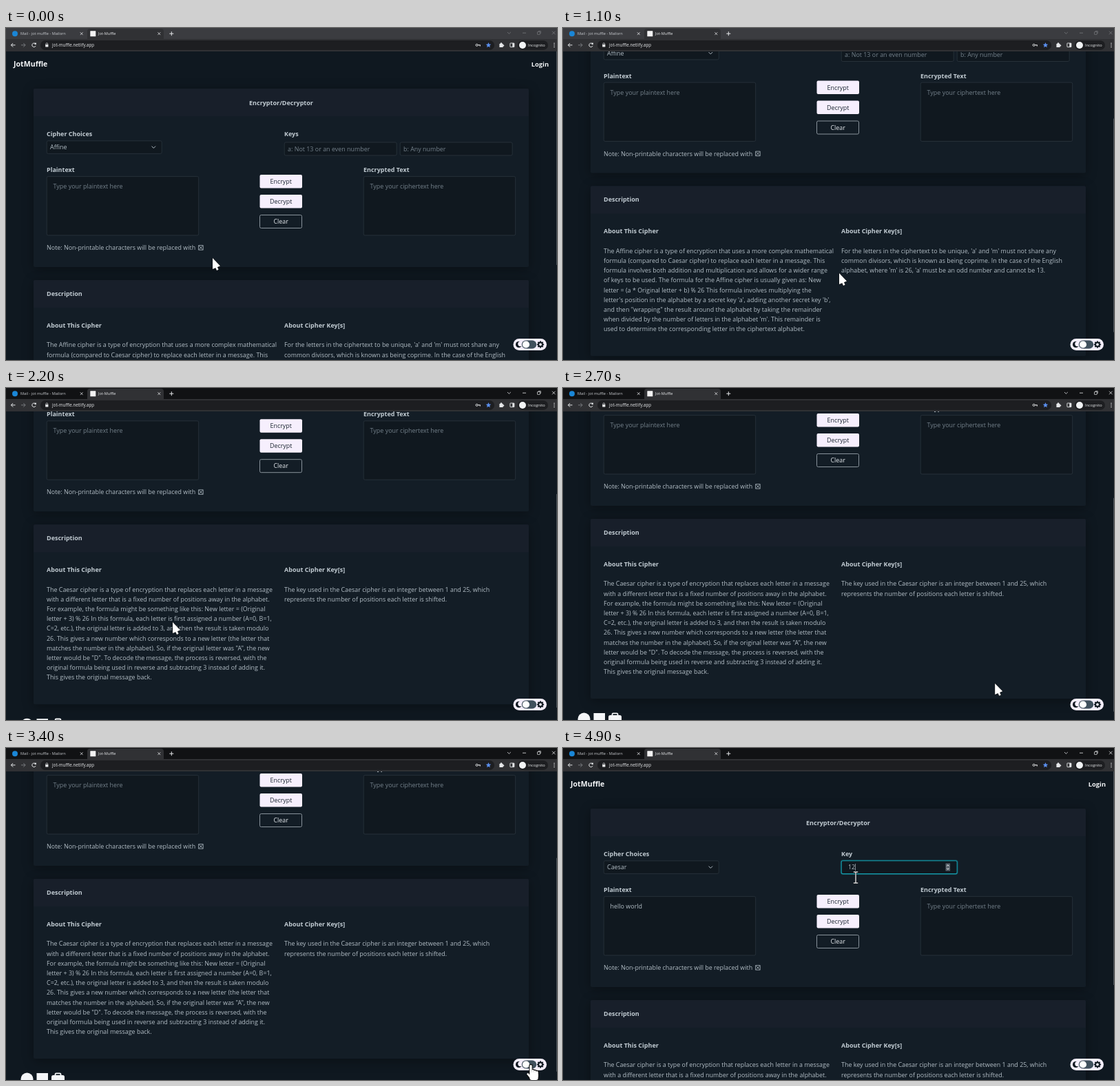
Recreate the animation shown at these times as an HTML page with a canvas. Size 800 px wide and 482 px high, loop 5 s.

```html
<!DOCTYPE html>
<html lang="en">
<head>
<meta charset="utf-8">
<title>Jot-Muffle</title>
<style>
html, body { margin: 0; width: 100%; height: 100%; overflow: hidden; background: #0f1820; }
canvas { display: block; width: 100vw; height: 100vh; }
</style>
</head>
<body>
<canvas id="stage" width="800" height="482"></canvas>
<script>
const g = document.getElementById('stage').getContext('2d');
const LOOP = 5000, STEP = 100, TOP = 34, LEADING = 14.2;

const DARK = {
  page: '#0f1820', card: '#131d26', head: '#181f2a', shadow: 'rgba(0,0,0,.35)', field: '#10181f',
  border: '#29333c', text: '#b3bec6', bold: '#c2ccd3', title: '#f4f6f8', hint: '#74818b',
  button: '#f6effd', label: '#1b2530', outline: '#89939b', clear: '#e6eaee', icon: '#f4f6f8',
  pill: '#f6effd', pillIcon: '#10181f', track: '#40505d', thumb: '#4a5259'
};
const LIGHT = {
  page: '#fefcff', card: '#fffeff', head: '#fdf9ff', shadow: 'rgba(110,70,130,.22)', field: '#fffeff',
  border: '#dbd7e0', text: '#4a5866', bold: '#35424e', title: '#1b2832', hint: '#75828c',
  button: '#1b2832', label: '#ffffff', outline: '#808b95', clear: '#33414d', icon: '#22272d',
  pill: '#1b2832', pillIcon: '#ffffff', track: '#12a0b4', thumb: '#9a9a9a'
};

const AFFINE = {
  name: 'Affine',
  about: [
    'The Affine cipher is a type of encryption that uses a more complex mathematical',
    'formula (compared to Caesar cipher) to replace each letter in a message. This',
    'formula involves both addition and multiplication and allows for a wider range',
    'of keys to be used. The formula for the Affine cipher is usually given as: New',
    'letter = (a * Original letter + b) % 26 This formula involves multiplying the',
    "letter's position in the alphabet by a secret key 'a', adding another secret key 'b',",
    'and then "wrapping" the result around the alphabet by taking the remainder',
    "when divided by the number of letters in the alphabet 'm'. This remainder is",
    'used to determine the corresponding letter in the ciphertext alphabet.'
  ],
  keys: [
    "For the letters in the ciphertext to be unique, 'a' and 'm' must not share any",
    'common divisors, which is known as being coprime. In the case of the English',
    "alphabet, where 'm' is 26, 'a' must be an odd number and cannot be 13."
  ]
};
const CAESAR = {
  name: 'Caesar',
  about: [
    'The Caesar cipher is a type of encryption that replaces each letter in a message',
    'with a different letter that is a fixed number of positions away in the alphabet.',
    'For example, the formula might be something like this: New letter = (Original',
    'letter + 3) % 26 In this formula, each letter is first assigned a number (A=0, B=1,',
    'C=2, etc.), the original letter is added to 3, and then the result is taken modulo',
    '26. This gives a new number which corresponds to a new letter (the letter that',
    'matches the number in the alphabet). So, if the original letter was "A", the new',
    'letter would be "D". To decode the message, the process is reversed, with the',
    'original formula being used in reverse and subtracting 3 instead of adding it.',
    'This gives the original message back.'
  ],
  keys: [
    'The key used in the Caesar cipher is an integer between 1 and 25, which',
    'represents the number of positions each letter is shifted.'
  ]
};

// Motion

function ease(t, from, to) {
  const u = Math.min(1, Math.max(0, (t - from) / (to - from)));
  return u * u * (3 - 2 * u);
}
const scrollAt = t =>
  117 * ease(t, 200, 770) + 19.5 * ease(t, 1000, 1100) - 136.5 * ease(t, 1100, 1500) +
  176 * (ease(t, 1900, 2245) - ease(t, 3400, 3700));

const REST = { x: 300, y: 334 };
const STOPS = [
  { at: 1100, x: 401, y: 356 },
  { at: 1500, x: 150, y: 176 },
  { at: 2200, x: 242, y: 340 },
  { at: 2800, x: 762, y: 460 },
  { at: 3800, x: 229, y: 255 },
  { at: 4700, x: 425, y: 188 }
];
function pointerAt(t) {
  let { x, y } = REST;
  for (const p of STOPS) {
    const u = ease(t, p.at - 300, p.at);
    x += (p.x - x) * u;
    y += (p.y - y) * u;
  }
  return { x, y };
}

function stateAt(t) {
  return {
    ...pointerAt(t),
    scroll: scrollAt(t),
    theme: t >= 3000 && t < 3400 ? LIGHT : DARK,
    cipher: t < 1800 ? AFFINE : CAESAR,
    windowFocus: t >= 1600,
    pointer: t >= 3800 ? beam : t >= 2800 && t <= 3400 ? hand : arrow,
    caret: t === 3800,
    plain: 'hello world'.slice(0, Math.max(0, (t - 3800) / 50)),
    plainFocus: t >= 3900 && t < 4600,
    keyFocus: t >= 4700,
    key: '12'.slice(0, Math.max(0, (t - 4700) / 100))
  };
}

// Drawing helpers

function text(s, x, y, color, { size = 8.93, bold = false, align = 'left' } = {}) {
  g.save();
  g.translate(x, y + size * .35);
  g.scale(.1, .1); // keeps fractional glyph advances
  g.font = `${bold ? 700 : 400} ${size * 10}px "Open Sans", "Noto Sans", sans-serif`;
  g.textAlign = align;
  g.fillStyle = color;
  g.fillText(s, 0, 0);
  g.restore();
}
const strong = (s, x, y, color, opt) => text(s, x, y, color, { size: 9, bold: true, ...opt });

function paint(fill, stroke, lw) {
  if (fill) { g.fillStyle = fill; g.fill(); }
  if (stroke) { g.strokeStyle = stroke; g.lineWidth = lw; g.stroke(); }
}
function box(x, y, w, h, r, fill, stroke, lw = .8) {
  g.beginPath();
  g.roundRect(x, y, w, h, r);
  paint(fill, stroke, lw);
}
function dot(x, y, r, fill, stroke, lw = 1) {
  g.beginPath();
  g.arc(x, y, r, 0, 7);
  paint(fill, stroke, lw);
}
function line(color, lw, ...pts) {
  g.beginPath();
  for (let i = 0; i < pts.length; i += 2) g.lineTo(pts[i], pts[i + 1]);
  paint(null, color, lw);
}
function cross(x, y, r, color) {
  for (const k of [-r, r]) line(color, .8, x - r, y - k, x + r, y + k);
}
// dir 1 points down, -1 points up
const chevron = (x, y, r, dir, color, lw = 1) =>
  line(color, lw, x - r, y - r * dir / 2, x, y + r * dir / 2, x + r, y - r * dir / 2);

// Page

function card(y, h, c) {
  g.save();
  g.shadowColor = c.shadow;
  g.shadowBlur = 16;
  g.shadowOffsetY = 3;
  box(40, y, 719, h, 2, c.card);
  g.restore();
  box(40, y, 719, 40, [2, 2, 0, 0], c.head);
}
function field(x, y, w, h, c, focus) {
  if (focus) box(x, y, w, h, 2.5, null, 'rgba(16,150,170,.35)', 3);
  box(x, y, w, h, 2, c.field, focus ? '#159aa9' : c.border, focus ? 1.1 : .9);
}
function area(label, x, value, hint, c, focus) {
  strong(label, x, 206, c.bold);
  field(x + .2, 215.6, 220.5, 85.4, c, focus);
  text(value || hint, x + 9.6, 230, value ? c.text : c.hint);
}
function button(s, i, c) {
  const y = 213 + 29 * i, outlined = s === 'Clear';
  if (outlined) box(368.5, y + .5, 61, 19, 2, null, c.outline, 1);
  else box(368.5, y, 61.5, 19.5, 2, c.button);
  text(s, 399.2, y + 10, outlined ? c.clear : c.label, { align: 'center' });
}
function keyField(s, c) {
  if (s.cipher === AFFINE) {
    strong('Keys', 404, 154, c.bold);
    ['a: Not 13 or an even number', 'b: Any number'].forEach((hint, i) => {
      field(404.2 + 168 * i, 166, 163, 19, c);
      text(hint, 409 + 168 * i, 175.5, c.hint);
    });
    return;
  }
  strong('Key', 404, 154, c.bold);
  field(404.2, 163.8, 168, 18.8, c, s.keyFocus);
  text(s.key || 'i.e. 1-25', 414, 173, s.key ? c.text : c.hint);
  if (s.keyFocus) {
    box(555.5, 167.5, 6.6, 11, 0, '#59636c');
    for (const dir of [-1, 1]) chevron(558.8, 173 + 2.4 * dir, 1.6, dir, '#fff');
    box(414.3 + s.key.length * 4.9, 168, .7, 10, 0, c.text);
  }
}

function form(s, c) {
  card(88, 259, c);
  strong('Encryptor/Decryptor', 399.5, 108.5, c.bold, { align: 'center' });
  strong('Cipher Choices', 59, 154, c.bold);
  field(59.2, 163.8, 167, 18.6, c);
  text(s.cipher.name, 64, 173, c.text);
  chevron(214.3, 173, 2.8, 1, c.text);
  keyField(s, c);

  area('Plaintext', 59, s.plain, 'Type your plaintext here', c, s.plainFocus);
  area('Encrypted Text', 519, '', 'Type your ciphertext here', c);
  if (s.caret) box(68.3, 224.5, .7, 11, 0, c.text);
  ['Encrypt', 'Decrypt', 'Clear'].forEach((label, i) => button(label, i, c));

  text('Note: Non-printable characters will be replaced with', 59, 319, c.text);
  box(279.6, 315.6, 6.6, 6.6, 0, null, c.text);
  cross(282.9, 318.9, 2.6, c.text);
}

function column(title, lines, x, c) {
  strong(title, x, 431.7, c.bold);
  lines.forEach((l, i) => text(l, x, 460.2 + i * LEADING, c.text));
}
function description(s, c) {
  const { about, keys } = s.cipher;
  const end = 485 + about.length * LEADING;
  card(366, end - 366, c);
  strong('Description', 59, 385.7, c.bold);
  column('About This Cipher', about, 59, c);
  column('About Cipher Key[s]', keys, 404, c);

  dot(30.5, end + 29.5, 9, c.icon);
  box(44.5, end + 21, 16.5, 17, 0, c.icon);
  box(66, end + 24, 19, 15, 2.5, c.icon);
  box(71.5, end + 21.3, 8, 5, 1.5, null, c.icon, 1.8);
}

function themeSwitch(c) {
  const y = 459.5;
  box(736.5, y - 8.5, 48.5, 17, 8.5, c.pill);
  dot(744.6, y, 4.6, c.pillIcon);
  dot(747, y - .9, 3.7, c.pill);
  box(748.8, y - 6.1, 21.4, 12.2, 6.1, c.track);
  dot(c === LIGHT ? 763.8 : 755, y, 5.1, '#fff');
  dot(776, y, 2.9, null, c.pillIcon, 2);
  for (let a = 0; a < 6; a += Math.PI / 4) {
    const dx = Math.cos(a), dy = Math.sin(a);
    line(c.pillIcon, 1.9, 776 + dx * 3, y + dy * 3, 776 + dx * 5.1, y + dy * 5.1);
  }
}

// Browser window

const INK = '#e6e8ea', BAR = '#303134', PILL = '#1d1e21';

function tab(title, x, end, color) {
  text(title, x, 8.3, color, { size: 5.6 });
  cross(end, 8.2, 1.9, INK);
}
function navArrow(x, dir, color) {
  line(color, 1, x - 3 * dir, 24.8, x + 3 * dir, 24.8);
  line(color, 1, x + .3 * dir, 22, x + 3.1 * dir, 24.8, x + .3 * dir, 27.6);
}
function windowControls(color) {
  chevron(730.4, 7.2, 2.4, 1, color, .8);
  line(color, .8, 750, 7.2, 755, 7.2);
  box(771.5, 5.6, 3.8, 3.8, .3, null, color, .7);
  line(color, .7, 772.8, 4.5, 776.3, 4.5, 776.3, 8);
  cross(795.3, 7, 2.3, color);
}
function star(x, y, r, color) {
  g.beginPath();
  for (let i = 0; i < 10; i++) {
    const a = i * Math.PI / 5, d = i % 2 ? r * .45 : r;
    g.lineTo(x + d * Math.sin(a), y - d * Math.cos(a));
  }
  paint(color);
}

function browser(focused) {
  box(0, 0, 800, TOP, 0, focused ? '#111214' : '#3b3c40');
  box(118, 1, 111, 18, [4, 4, 0, 0], BAR);
  box(0, 16, 800, 18, 0, BAR);
  dot(13, 8.3, 4, '#1a86d6');
  tab('Mail - jot muffle - Mailorn', 21, 109.7, '#c9ccd0');
  box(122.3, 4.3, 8, 8, .5, '#f4f4f4');
  tab('Jot-Muffle', 134, 222.3, INK);
  line(INK, 1, 237.3, 8.2, 243.3, 8.2);
  line(INK, 1, 240.3, 5.2, 240.3, 11.2);
  windowControls(focused ? INK : '#77797d');

  navArrow(10.5, -1, INK);
  navArrow(25, 1, '#777a7e');
  g.beginPath();
  g.arc(40.6, 24.8, 2.8, .4, 5.5);
  paint(null, INK, 1);
  box(41.6, 21.6, 2.3, 2.3, 0, INK);

  box(50, 18, 659, 14, 7, PILL);
  box(57.2, 24, 4.2, 3.6, .5, INK);
  box(58, 21.8, 2.6, 4, 1.2, null, INK, .7);
  text('jot-muffle.netlify.app', 67, 24.9, INK, { size: 6.3 });
  dot(683.6, 24.8, 1.5, null, INK);
  line(INK, 1.1, 685, 24.8, 688.3, 24.8, 688.3, 26.6);
  star(700.5, 25, 4, '#5b90f2');

  box(716.4, 22.8, 5.2, 5.2, .6, INK);
  dot(719, 22.4, 1.2, INK);
  dot(722, 25.4, 1.2, INK);
  box(731.9, 22, 6, 5.6, .5, null, INK, .9);
  box(735.3, 22, 2.6, 5.6, 0, INK);
  box(743, 18.3, 44, 13.4, 6.7, PILL);
  dot(750, 25, 5, '#f1f3f4');
  text('Incognito', 758, 24.9, INK, { size: 5.7 });
  for (const dy of [-1, 0, 1]) dot(796, 24.8 + 2.6 * dy, .75, INK);
}

// Pointers, each drawn as a dark edge first and a white body on top

function edged(shape) {
  shape('#111', 1);
  shape('#fff', 0);
}
function arrow() {
  edged((color, edge) => {
    line(color, 2.8 + edge, 4, 10, 7.3, 17.4);
    g.beginPath();
    g.moveTo(0, 0);
    g.lineTo(0, 16);
    g.lineTo(11, 11.4);
    g.closePath();
    paint(color, edge && color, edge);
  });
}
function hand() {
  edged((color, e) => {
    box(-1.6 - e, -e, 3.2 + 2 * e, 16 + 2 * e, 1.6, color);
    for (let i = 1; i < 4; i++) box(-1.6 + 3 * i - e, 6 + i - e, 3.2 + 2 * e, 9 + 2 * e, 1.6, color);
    box(-1.6 - e, 11 - e, 12.2 + 2 * e, 11 + 2 * e, 3, color);
    line(color, 2.6 + 2 * e, -5, 12.5, 1, 20);
  });
}
function beam() {
  for (const [color, lw] of [['#0a0d10', 2.4], ['#f2f2f2', 1.3]]) {
    line(color, lw, 0, -8, 0, 8);
    for (const y of [-8, 8]) line(color, lw, -3.2, y, 3.2, y);
  }
}

function draw(t) {
  const s = stateAt(t), c = s.theme;
  box(0, 0, 800, 482, 0, c.page);
  g.save();
  g.translate(0, -s.scroll);
  strong('JotMuffle', 11, 52.5, c.title, { size: 10.6 });
  strong('Login', 788, 52.3, c.title, { size: 9.3, align: 'right' });
  form(s, c);
  description(s, c);
  g.restore();
  box(799, TOP + s.scroll * .715, 1, 310, 0, c.thumb);
  themeSwitch(c);
  browser(s.windowFocus);
  g.save();
  g.translate(s.x, s.y);
  s.pointer();
  g.restore();
}

const start = performance.now();
function tick(now) {
  const t = Math.max(0, now - start) % LOOP;
  draw(Math.floor(t / STEP) * STEP);
  requestAnimationFrame(tick);
}
draw(0);
requestAnimationFrame(tick);
</script>
</body>
</html>
```
